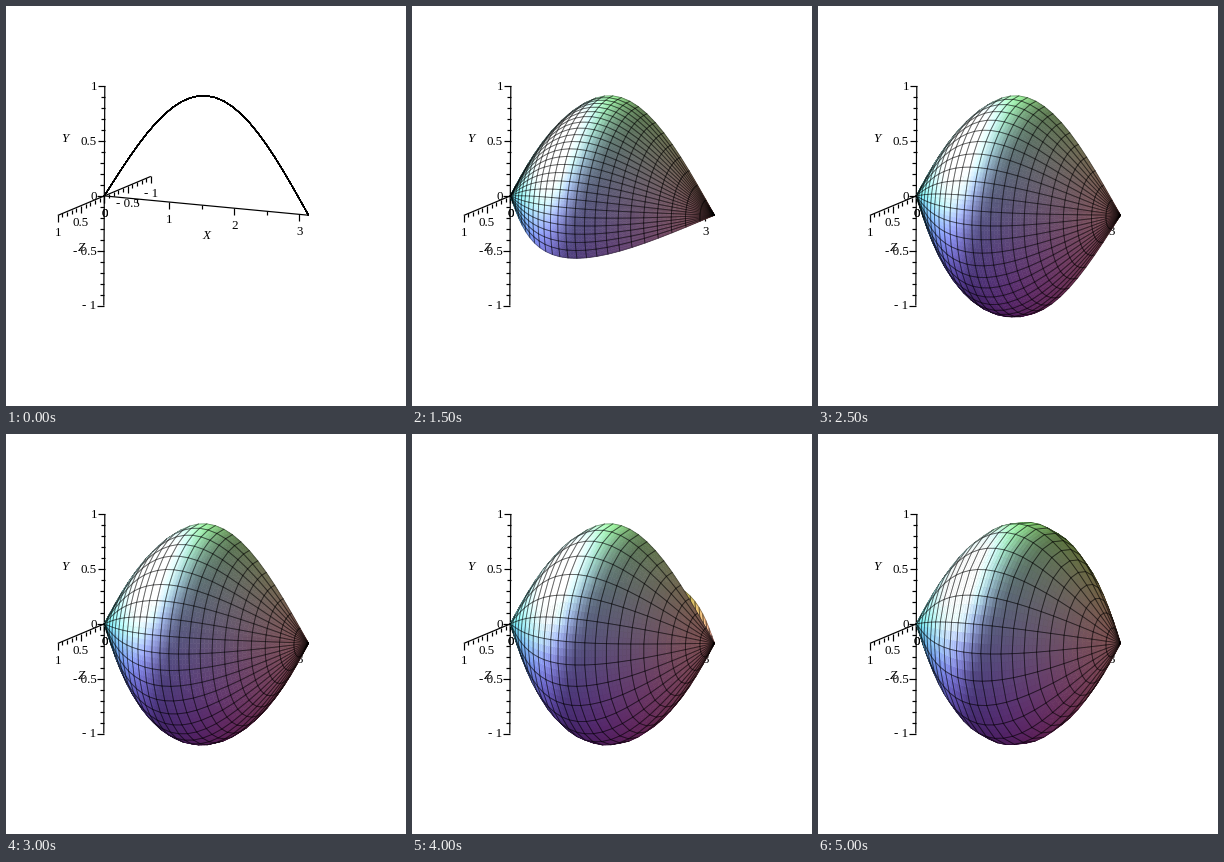
A matplotlib script for the animation above (5500 ms loop, 400x400 px).

```python
import numpy as np
import matplotlib.pyplot as plt
from matplotlib.animation import FuncAnimation
from matplotlib.collections import LineCollection, PolyCollection

SIZE, DPI = 400, 100
PX = 72 / DPI
FRAMES, INTERVAL = 11, 500
NODES, SUB = 25, 3

# Screen position of the origin and of one unit along each axis
O = np.array([97.8, 189.4])
VX = np.array([65.0, 6.15])
VY = np.array([0.5, -109.7])
VZ = np.array([-46.5, 19.5])

LIGHT = np.array([-0.80, 0.57, 0.15])
GLOSS = np.array([-0.46, 0.58, 0.67])

fig = plt.figure(figsize=(SIZE / DPI, SIZE / DPI), dpi=DPI, facecolor="white")
ax = fig.add_axes([0, 0, 1, 1])
ax.set_xlim(-0.5, SIZE - 0.5)
ax.set_ylim(SIZE - 0.5, -0.5)
ax.axis("off")


def project(x, y, z):
    return O + np.multiply.outer(x, VX) + np.multiply.outer(y, VY) + np.multiply.outer(z, VZ)


def label(pos, text, ha="center", style="normal"):
    ax.text(pos[0], pos[1] - 0.7, text, ha=ha, va="center_baseline", style=style,
            family="Liberation Serif", fontsize=13 * PX, zorder=1)


def draw_axis(vec, lo, hi, minor, major, side, text_gap, ha="center"):
    """Axis line with ticks pointing along side and numbers beyond them."""
    side = np.array(side)
    lines = [(O + lo * vec, O + hi * vec)]
    for i in range(round(lo / minor), int(hi / minor + 1e-6) + 1):
        v = i * minor
        is_major = i % round(major / minor) == 0
        p = O + v * vec
        lines.append((p, p + side * (7 if is_major else 4)))
        if is_major:
            label(p + side * text_gap, f"{v:g}".replace("-", "- "), ha)
    ax.add_collection(LineCollection(lines, colors="black", linewidths=1.2 * PX, zorder=1))


draw_axis(VX, 0, np.pi, 0.5, 1, (0, 1), 17)
draw_axis(VY, -1, 1, 0.1, 0.5, (-1, 0), 7.5, "right")
draw_axis(VZ, -1, 1, 0.1, 0.5, (0, 1), 17)
for name, pos in {"X": (200, 228.5), "Y": (58, 131.5), "Z": (75, 240.5)}.items():
    label(pos, name, style="italic")

# Back-facing cells lie below front-facing ones; the body is convex
fills, meshes = [], []
for z in (2, 4):
    fills.append(ax.add_collection(PolyCollection([], linewidths=0.5 * PX, zorder=z)))
    meshes.append(ax.add_collection(LineCollection(
        [], colors=[(0, 0, 0, 0.38)], linewidths=0.9 * PX, zorder=z + 1,
        capstyle="round", joinstyle="round")))

coarse = np.linspace(0, 1, NODES)
fine = np.linspace(0, 1, (NODES - 1) * SUB + 1)
WEIGHTS = np.array([np.interp(fine, coarse, row) for row in np.eye(NODES)]).T


def refine(a):
    return np.einsum("pi,ijc,qj->pqc", WEIGHTS, a, WEIGHTS, optimize=True)


def quads(p):
    q = np.stack([p[:-1, :-1], p[1:, :-1], p[1:, 1:], p[:-1, 1:]], axis=2)
    return q.reshape(-1, 4, p.shape[-1])


def areas(q):
    a, b = q[:, 2] - q[:, 0], q[:, 3] - q[:, 1]
    return (a[:, 0] * b[:, 1] - a[:, 1] * b[:, 0]) / 2


def shade(base, normal):
    diffuse = np.clip(normal @ LIGHT, 0, None)[..., None]
    gloss = np.clip(normal @ GLOSS, 0, 1)[..., None] ** 6
    return np.clip(base * (0.52 + 0.95 * diffuse) + 0.65 * gloss, 0, 1)


def update(k):
    sweep = 2 * np.pi * k / (FRAMES - 1)
    x, t = np.meshgrid(coarse * np.pi, coarse * sweep, indexing="ij")
    y, z = np.sin(x) * np.cos(t), np.sin(x) * np.sin(t)
    pts = project(x, y, z)

    # Red, green and blue follow x, y and z
    base = 0.2 + 0.75 * np.stack([x / np.pi, (y + 1) / 2, (z + 1) / 2], axis=-1)
    normal = np.stack([-np.pi / 2 * np.cos(x), np.cos(t), np.sin(t)], axis=-1)
    normal /= np.linalg.norm(normal, axis=-1, keepdims=True)

    cells, parts = quads(pts), quads(refine(pts))
    cell_area, part_area = areas(cells), areas(parts)
    outlines = np.concatenate([cells, cells[:, :1]], axis=1)
    for fill, mesh, sign in zip(fills, meshes, (-1, 1)):
        seen = part_area * sign > 1e-6
        colors = quads(refine(shade(base, sign * normal))).mean(axis=1)[seen]
        fill.set_verts(parts[seen])
        fill.set_facecolor(colors)
        fill.set_edgecolor(colors)
        mesh.set_segments(outlines[cell_area * sign >= 0])
    return fills + meshes


anim = FuncAnimation(fig, update, frames=FRAMES, interval=INTERVAL,
                     init_func=lambda: update(0), repeat=True, repeat_delay=0, blit=False)
plt.show()
```
